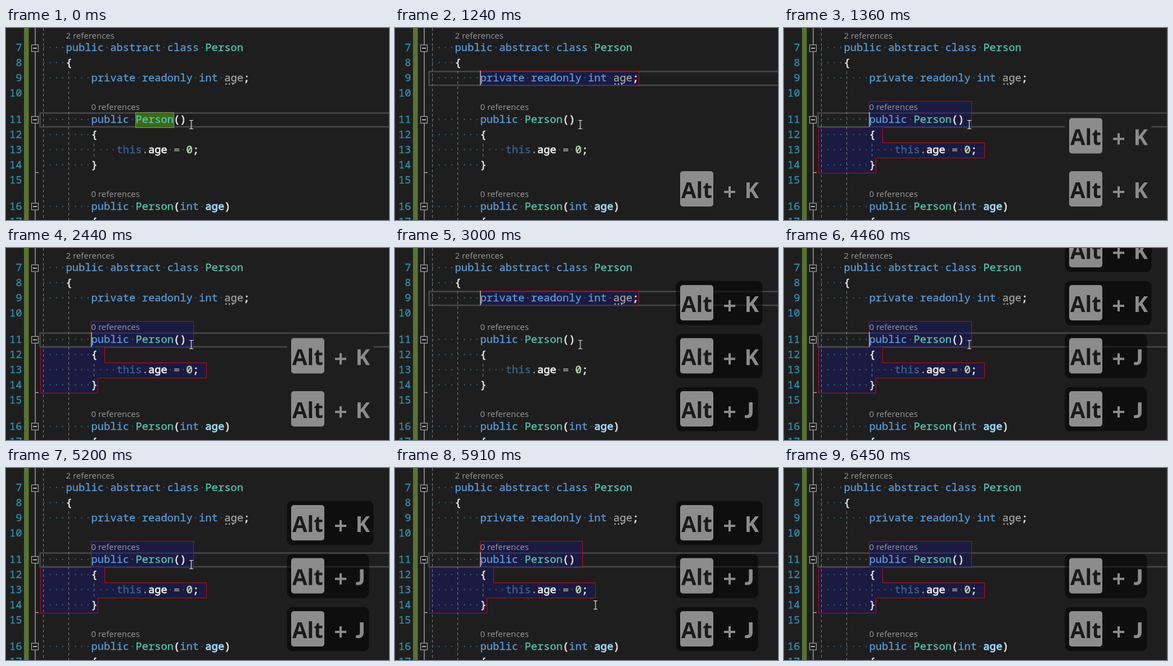
An HTML page for the animation above (6570 ms loop, 681x342 px).

```html
<!DOCTYPE html>
<html lang="en">
<head>
<meta charset="utf-8">
<title>Code navigation</title>
<style>
html, body { margin: 0; width: 100%; height: 100%; overflow: hidden; background: #1e1e1e; }
svg { display: block; }
.code { font: 18.78px "Noto Sans Mono", monospace; fill: currentColor; stroke: currentColor; stroke-width: .35; }
.lens { font: 15px "Open Sans", sans-serif; fill: #999; }
.num { color: #2b91af; }
.ws { color: #2b5d75; stroke: none; }
.kw { color: #569cd6; }
.ty { color: #4ec9b0; }
.pl { color: #e0e0e0; stroke-width: .8; }
.dim { color: #a0a0a0; }
.self { color: #3b6690; }
.field { color: #e6e6e6; stroke-width: .9; }
.lit { color: #b5cea8; stroke-width: .8; }
.param { color: #9cdcfe; stroke-width: .9; }
.guide { stroke: #7d7d7d; stroke-dasharray: 5 4; }
.sel { fill: #191774; fill-opacity: .42; }
.edge { fill: none; stroke: #c00a14; }
.cap { font: 700 38.5px "Open Sans", sans-serif; }
.cap-j { font: 900 38.5px Lato, sans-serif; }
.key { fill: #8c8c8c; }
.ink { fill: #1a1a1a; }
</style>
</head>
<body>
<svg id="stage" width="681" height="342" viewBox="0 0 681 342"></svg>
<script>
const LOOP = 6570, CHAR = 11.268, LEFT = 61.4;
const stage = document.getElementById('stage');

function add(parent, tag, attrs = {}, text) {
  const el = document.createElementNS('http://www.w3.org/2000/svg', tag);
  for (const k in attrs) el.setAttribute(k, attrs[k]);
  if (text !== undefined) el.textContent = text;
  parent.append(el);
  return el;
}
const rect = (p, x, y, width, height, attrs) => add(p, 'rect', { x, y, width, height, ...attrs });
const path = (p, d, attrs) => add(p, 'path', { d, ...attrs });

// Hold each value from its time until the next one.
function hold(el, prop, steps) {
  const frames = steps.map(([t, v]) => ({ [prop]: v, offset: t / LOOP, easing: 'steps(1, end)' }));
  if (steps[0][0] > 0) frames.unshift({ ...frames[0], offset: 0 });
  frames.push({ [prop]: steps.at(-1)[1], offset: 1 });
  el.animate(frames, { duration: LOOP, iterations: Infinity });
}
const show = (el, steps) => hold(el, 'opacity', [[0, 0], ...steps]);
const move = (el, steps) => hold(el, 'transform', steps.map(([t, x, y]) => [t, `translate(${x}px, ${y}px)`]));

// Margin
rect(stage, 0, 0, 681, 342, { fill: '#1e1e1e' });
rect(stage, 32, 0, 8.5, 342, { fill: '#577430' });
path(stage, 'M52 0V342M52 257.5H58', { stroke: '#a5a5a5', 'stroke-width': 1.4, fill: 'none' });
for (const y of [36, 163.5, 318]) {
  rect(stage, 45.5, y - 6, 12, 12, { fill: '#1e1e1e', stroke: '#a5a5a5', 'stroke-width': 1.2 });
  path(stage, `M48 ${y}H55`, { stroke: '#e0e0e0', 'stroke-width': 1.5 });
}

// Current line and highlights
const rows = [[0, 0, 74], [120, 0, 0], [1360, 0, 74], [3000, 0, 0], [4460, 0, 74]];
const line = rect(stage, 60.5, 77.5, 640, 24.5, { fill: 'none', stroke: '#464646', 'stroke-width': 2.6 });
move(line, rows);

const name = rect(stage, 230.5, 150.5, 68, 27, { fill: '#3d6a14', stroke: '#7f9468' });
hold(name, 'opacity', [[0, 1], [120, 0]]);

const member = add(stage, 'g');
rect(member, 151.5, 76.5, 282, 26, { class: 'sel' });
rect(member, 151.5, 76.5, 282, 26, { class: 'edge' });
show(member, [[120, 1], [1360, 0], [3000, 1], [4460, 0]]);

const ctor = add(stage, 'g');
const outline = 'M151.5 130.5H333.5V177.5H175.5V204.5H356.5V231.5H163.5V258.5H61.5V177.5H151.5Z';
path(ctor, outline, { class: 'sel' });
path(ctor, outline, { class: 'edge' });
show(ctor, [[1360, 1], [3000, 0], [4460, 1]]);

path(stage, 'M66.5 0V342M111.5 77V342M156.5 206V232', { class: 'guide' });

// Code
function code(num, y, col, ...tokens) {
  add(stage, 'text', { class: 'code num', x: 28.5 - CHAR * String(num).length, y }, num);
  let at = 0;
  const put = (cls, s) => {
    add(stage, 'text', { class: 'code ' + cls, x: LEFT + at * CHAR, y }, s);
    at += s.length;
  };
  if (col) put('ws', '·'.repeat(col));
  for (const [cls, text] of tokens)
    for (const part of text.split(/( )/)) {
      if (part === ' ') put('ws', '·');
      else if (part) put(cls, part);
    }
}
const lens = (x, y, n) => add(stage, 'text', { class: 'lens', x, y }, n + ' references');

lens(106.5, 19, 2);
code(7, 41, 4, ['kw', 'public abstract class '], ['ty', 'Person']);
code(8, 68, 4, ['pl', '{']);
code(9, 95, 8, ['kw', 'private readonly int '], ['dim', 'age'], ['pl', ';']);
code(10, 122, 0);
lens(151.5, 146, 0);
code(11, 169, 8, ['kw', 'public '], ['ty', 'Person'], ['pl', '()']);
code(12, 196, 8, ['pl', '{']);
code(13, 223, 12, ['self', 'this'], ['dim', '.'], ['field', 'age '], ['dim', '= '], ['lit', '0'], ['pl', ';']);
code(14, 250, 8, ['pl', '}']);
code(15, 277, 0);
lens(151.5, 301, 0);
code(16, 324, 8, ['kw', 'public '], ['ty', 'Person'], ['pl', '('], ['kw', 'int '], ['param', 'age'], ['pl', ')']);
code(17, 351, 8, ['pl', '{']);
for (const x of [390, 396, 402]) rect(stage, x, 98.5, 2.5, 2.5, { fill: '#a0a0a0' });

// Caret
const caret = rect(stage, 151, 76, 1.6, 26, { fill: '#c8a8b4' });
move(caret, rows);
show(caret, [[120, 1], [680, 0], [1240, 1], [1910, 0], [2440, 1], [3530, 0],
  [4060, 1], [5050, 0], [5480, 1], [6030, 0]]);

// Pressed keys, stacked upwards from the bottom slot
const SLOTS = [247.5, 153, 58.5, -36];
function badge(key, times, fade = []) {
  const g = add(stage, 'g');
  const panel = rect(g, 499.5, 0, key === 'K' ? 154 : 146, 79, { rx: 10 });
  hold(panel, 'fill', [[0, '#1e1e1e'], [3000, 'rgba(0,0,0,.53)']]);
  rect(g, 507, 7.5, 59, 63, { rx: 5, class: 'key' });
  add(g, 'text', { x: 536.5, y: 55, 'text-anchor': 'middle', class: 'cap ink' }, 'Alt');
  path(g, 'M585 44.5H605M595 34.5V54.5', { stroke: '#8c8c8c', 'stroke-width': 4 });
  add(g, 'text', { x: 621.5, y: 55, class: key === 'J' ? 'cap-j key' : 'cap key' }, key);
  move(g, times.map((t, i) => [t, 0, SLOTS[i]]));
  show(g, [[times[0], 1], ...fade]);
}
badge('K', [120, 1360, 3000, 4460], [[5050, .5], [5200, 0]]);
badge('K', [1360, 3000, 4460], [[6180, .65], [6300, .3], [6450, 0]]);
badge('J', [3000, 4460]);
badge('J', [4460]);

// Mouse pointer
const beam = add(stage, 'g');
path(beam, 'M-3.5 -7.5H-1L0 -6.5L1 -7.5H3.5M0 -6.5V6.5M-3.5 7.5H-1L0 6.5L1 7.5H3.5',
  { fill: 'none', stroke: '#f0f0f0', 'stroke-width': 1.2 });
move(beam, [[0, 329.5, 172], [5760, 314.5, 159], [5910, 356.5, 244], [6030, 513, 318]]);
hold(beam, 'opacity', [[0, 1], [6180, 0]]);
</script>
</body>
</html>
```
